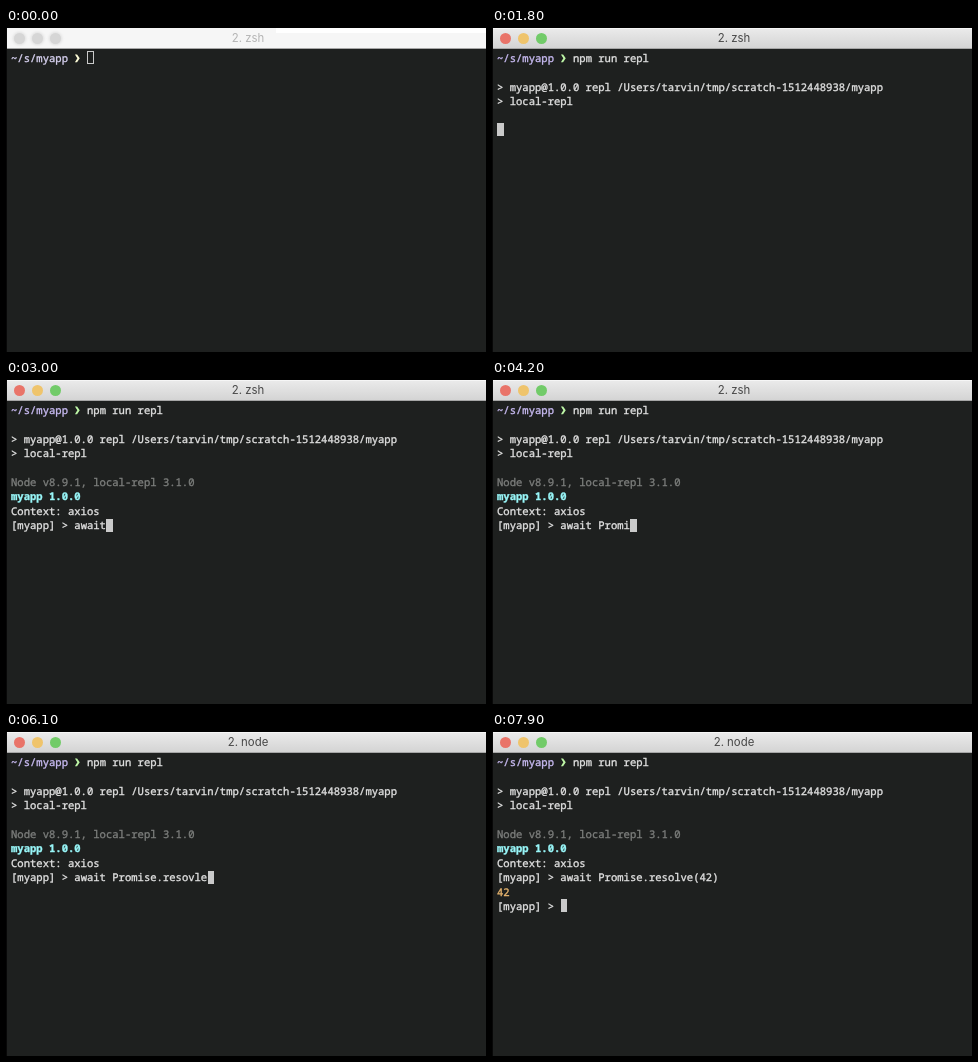
An HTML page that plays this animation: 480x324 px, repeating every 8 s.

```html
<!DOCTYPE html>
<html lang="en">
<head>
<meta charset="utf-8">
<title>Terminal</title>
<style>
  html, body { margin: 0; width: 100%; height: 100%; overflow: hidden; background: #1e201f; }
  #stage { position: relative; width: 480px; height: 324px; overflow: hidden; background: #1e201f; border-left: 1px solid #080808; box-sizing: border-box; }
  #bar { position: absolute; left: -1px; top: 0; width: 480px; height: 20px; background: linear-gradient(#ebebeb, #d4d4d4); border-bottom: 1px solid #a6a6a6; box-shadow: inset 0 1px #f6f6f6; }
  #bar i { position: absolute; top: 4.5px; width: 11px; height: 11px; border-radius: 50%; background: var(--c); }
  #title { position: absolute; left: 0; width: 484px; top: 0; text-align: center; font: 11.4px/20px Inter, Roboto, sans-serif; color: #474747; }
  #strip { position: absolute; right: 0; top: 0; width: 210px; height: 5px; background: #fff; display: none; }
  .idle #bar { background: #f6f6f6; }
  .idle #bar i { background: #d6d6d6; box-shadow: 0 0 3px 1px #dedede; }
  .idle #title { color: #b4b4b4; }
  .idle #strip { display: block; }
  .row { position: absolute; left: 4px; height: 14.4px; white-space: pre; color: #e2e2e2;
    font: 500 10.55px/14.4px "Noto Sans Mono", "DejaVu Sans Mono", monospace;
    -webkit-text-stroke: .35px; text-rendering: geometricPrecision; }
  .path { color: #cabcf4; }
  .idle .path { color: #d9d3f2; }
  .mark { position: absolute; left: 62.8px; top: 2.2px; width: 7px; height: 8.6px; fill: #bdf5a6; }
  .idle .mark { fill: #fbfad6; }
  .dim { color: #7c7e7c; }
  .app { color: #98f6f8; font-weight: 700; }
  .num { color: #ecb870; }
  #cursor { position: absolute; width: 6.6px; height: 13px; background: #cacaca; box-sizing: border-box; }
  .idle #cursor { background: none; border: 1px solid #cacaca; }
</style>
</head>
<body>
<div id="stage">
  <div id="bar">
    <i style="left:8px;--c:#e97469"></i><i style="left:26px;--c:#efc46c"></i><i style="left:44px;--c:#72cb69"></i>
    <div id="strip"></div>
    <div id="title"></div>
  </div>
  <div id="cursor"></div>
</div>
<script>
const LOOP = 8000, CHAR = 6.33, LINE = 14.4, TOP = 23.4;
const stage = document.getElementById('stage');
const title = document.getElementById('title');
const cursor = document.getElementById('cursor');

// Typing runs: start, ms per key, keys ("<" is backspace)
const shellKeys = [[400, 100, 'np'], [700, 85, 'm run repl']];
const nodeKeys = [
  [2600, 100, 'await'], [3200, 400, ' P'], [3800, 200, 'r'], [4000, 100, 'omis'], [4500, 400, 'e.'],
  [5100, 150, 'resovle'], [6300, 100, '<<<lve'], [7000, 120, '(42)']
];

// Output rows: line, time shown, markup
const output = [
  [2, 1800, '&gt; myapp@1.0.0 repl /Users/tarvin/tmp/scratch-1512448938/myapp'],
  [3, 1800, '&gt; local-repl'],
  [5, 2400, '<span class="dim">Node v8.9.1, local-repl 3.1.0</span>'],
  [6, 2400, '<span class="app">myapp 1.0.0</span>'],
  [7, 2400, 'Context: axios'],
  [9, 7600, '<span class="num">42</span>'],
  [10, 7700, '[myapp] &gt; ']
];

// Cursor stops: time, line, column of the prompt end, typed text that moves it
const stops = [
  [0, 0, 12, shellKeys], [1600, 1, 0], [1800, 5, 0], [2500, 8, 10, nodeKeys], [7600, 9, 0], [7700, 10, 10]
];

function addRow(line, html) {
  const row = document.createElement('div');
  row.className = 'row';
  row.style.top = TOP + .5 + line * LINE + 'px';
  row.innerHTML = html;
  stage.insertBefore(row, cursor);
  return row;
}

function typed(runs, t) {
  let text = '';
  for (const [start, step, keys] of runs)
    [...keys].forEach((key, i) => {
      if (t >= start + i * step) text = key === '<' ? text.slice(0, -1) : text + key;
    });
  return text;
}

const chevron = '<svg class="mark" viewBox="0 0 8 10"><path d="M1 0.5H3.5L6.6 5L3.5 9.5H1L3.8 5Z"/></svg>';
const shell = addRow(0, `<span class="path">~/s/myapp</span>${chevron}   <span></span>`).lastChild;
const prompt = addRow(8, '[myapp] &gt; <span></span>');
const rows = output.map(([line, at, html]) => [addRow(line, html), at]);
const show = (el, on) => { el.style.visibility = on ? 'visible' : 'hidden'; };

function render(t) {
  stage.className = t < 100 ? 'idle' : '';
  title.textContent = t < 4900 ? '2. zsh' : '2. node';
  shell.textContent = typed(shellKeys, t);
  prompt.lastChild.textContent = typed(nodeKeys, t);
  show(prompt, t >= 2500);
  for (const [row, at] of rows) show(row, t >= at);

  const [, line, col, keys] = stops.filter(s => t >= s[0]).pop();
  const x = col + (keys ? typed(keys, t).length : 0);
  cursor.style.left = 4.3 + x * CHAR + 'px';
  cursor.style.top = TOP + line * LINE + 'px';
}

const begin = performance.now();
function tick() {
  render((performance.now() - begin) % LOOP);
  requestAnimationFrame(tick);
}
render(0);
tick();
</script>
</body>
</html>
```
